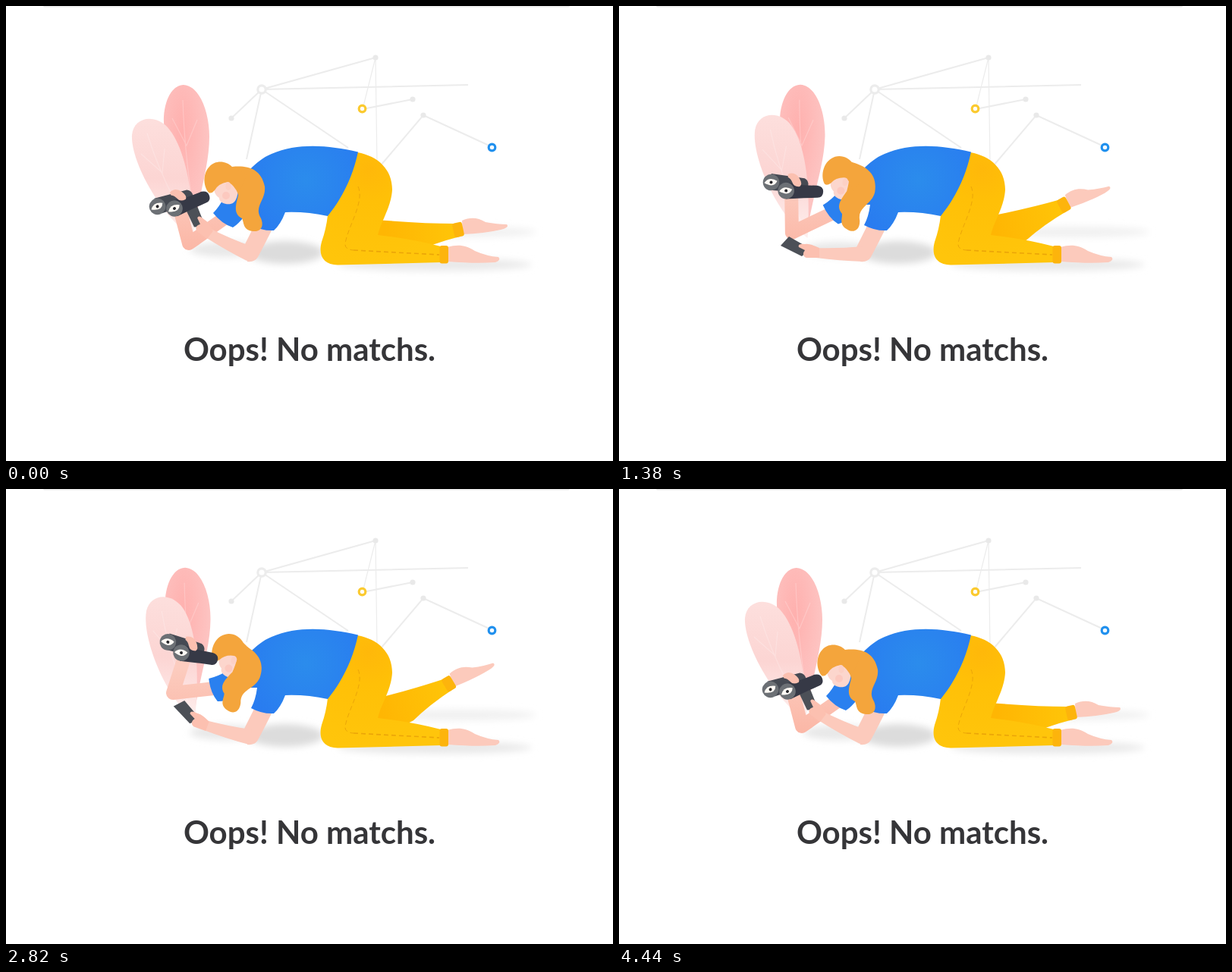
Animation of 800 by 600 pixels, one loop 4.47 s. Source, as an HTML page:

```html
<!DOCTYPE html>
<html lang="en">
<head>
<meta charset="utf-8">
<title>No matches</title>
<style>
html, body { margin: 0; width: 100%; height: 100%; overflow: hidden; background: #fff; }
svg { display: block; width: 800px; height: 600px; }
text { font: 700 42px Lato, sans-serif; fill: #353538; }
.net { fill: none; stroke: #ececec; stroke-width: 2; }
.vein { fill: none; stroke: #fff; stroke-width: 1.2; opacity: .22; }
.skin { fill: #fccabc; }
.cuff { fill: #fdb40c; }
.hair { fill: #f4a53c; }
</style>
</head>
<body>
<svg viewBox="0 0 800 600">
  <defs>
    <filter id="blur" x="-20%" y="-60%" width="140%" height="220%"><feGaussianBlur stdDeviation="5"/></filter>
    <radialGradient id="shirt" gradientUnits="userSpaceOnUse" cx="395" cy="230" r="85">
      <stop offset="0" stop-color="#2b8cec"/><stop offset="1" stop-color="#297cf0"/>
    </radialGradient>
    <radialGradient id="pants" gradientUnits="userSpaceOnUse" cx="478" cy="215" r="125">
      <stop offset="0" stop-color="#ffb80a"/><stop offset=".35" stop-color="#ffc007"/><stop offset="1" stop-color="#ffc50b"/>
    </radialGradient>
    <linearGradient id="farPants" gradientUnits="userSpaceOnUse" x1="500" y1="0" x2="590" y2="0">
      <stop offset="0" stop-color="#ffb603"/><stop offset="1" stop-color="#ffc408"/>
    </linearGradient>
    <linearGradient id="armSkin" gradientUnits="userSpaceOnUse" x1="0" y1="235" x2="0" y2="325">
      <stop offset="0" stop-color="#fcccbf"/><stop offset="1" stop-color="#fbb6a5"/>
    </linearGradient>
    <linearGradient id="paleLeaf" x1="0" y1="0" x2="0" y2="1">
      <stop offset="0" stop-color="#fddfdd"/><stop offset=".5" stop-color="#fcd5d3"/><stop offset="1" stop-color="#fef0ef"/>
    </linearGradient>
    <radialGradient id="pinkLeaf" cx=".4" cy=".32" r=".6">
      <stop offset="0" stop-color="#ffb0ae"/><stop offset="1" stop-color="#fdc4c2"/>
    </radialGradient>
  </defs>

  <rect x="49" y="-4" width="694" height="5.6" rx="2" fill="#e7e7e7"/>

  <g class="net">
    <path d="M297 148L337 110L487 68M609 104L337 110L317 202M337 110L451 187M470 136L536 123M494 210L550 144L641 186"/>
    <path d="M470 136L487 68L489 208" stroke-width="1.2"/>
    <g fill="#fff" stroke-width="3.2">
      <circle cx="337" cy="110" r="5.2"/>
      <circle cx="469.5" cy="135.5" r="4.3" stroke="#fbca2f"/>
      <circle cx="640.5" cy="186.5" r="4.3" stroke="#2090ee"/>
    </g>
    <path d="M297 148h0M487 68h0M536 123h0M550 144h0" stroke="#e9e9e9" stroke-width="7.2" stroke-linecap="round"/>
  </g>

  <g id="backLeaf">
    <path fill="url(#pinkLeaf)" d="M249 292C234 245 206 182 208 146C210 118 222 104 234 104C255 105 268 140 268 172C268 210 255 245 249 292Z"/>
    <path class="vein" d="M233 124Q235 190 247 270M219 148L238 184L252 150"/>
  </g>
  <g id="frontLeaf">
    <path fill="url(#paleLeaf)" d="M248 306C205 280 164 205 166 170C168 147 195 141 213 160C235 185 246 240 248 306Z"/>
    <path class="vein" d="M186 168Q205 230 246 300M178 195L206 220L209 188"/>
  </g>

  <g filter="url(#blur)">
    <ellipse cx="290" cy="321" rx="48" ry="10" fill="#e8e8e8"/>
    <ellipse cx="368" cy="325" rx="50" ry="15" fill="#dcdcdc"/>
    <ellipse cx="595" cy="298" rx="104" ry="7" fill="#f0f0f0"/>
    <ellipse cx="565" cy="341" rx="128" ry="8" fill="#e8e8e8"/>
  </g>

  <g id="farLeg">
    <path class="skin" d="M601 283C612 278 622 279 632 285Q648 288 660 288Q664 292 652 295Q630 300 602 301Z"/>
    <path fill="url(#farPants)" d="M478 281Q545 287 591 287L598 304Q563 313 536 326L474 335Z"/>
    <rect class="cuff" x="-6.5" y="-9.5" width="13" height="19" rx="3" transform="translate(596 295) rotate(-12)"/>
  </g>
  <path class="skin" d="M582 318C595 314 606 315 618 323Q634 330 649 331Q653 335 645 338Q620 340 582 337Z"/>
  <path fill="url(#pants)" d="M463 193C491 198 509 216 509 242C508 265 494 284 490 302Q535 307 573 317L574 338L437 341.5C419 341 411 330 416 311Q422 294 424 276L463 193Z"/>
  <g fill="none" stroke="#eba508" stroke-dasharray="6 4">
    <path d="M464 238C473 258 451 290 447 313Q446 321 458 322" stroke-width="1"/>
    <path d="M458 322L571 328" stroke-width="1.6"/>
  </g>
  <rect class="cuff" x="571.5" y="316" width="11.5" height="23.5" rx="3"/>

  <path id="arm" fill="none" stroke="url(#armSkin)" stroke-width="18" stroke-linejoin="round"/>
  <path id="sleeve" fill="#2a80ef" d="M302 243L287 253Q281 265 273 273Q284 287 299 292Q306 288 316 275L320 255Z"/>
  <path class="skin" d="M328 288L351 294Q340 316 332 331Q328 338 318 337L313 318Z"/>
  <path fill="url(#shirt)" d="M464 192.500C425 183.500 385 180 350 195C338 200 330 207 322 215L312 262L331 262Q329 278 323 289Q338 297 353 296Q362 288 368 272Q396 271 424 277C444 252 457 225 464 192.500Z"/>

  <g id="forearm">
    <path class="skin" d="M322 337Q290 336 260 332L258 319Q290 320 322 317Z"/>
    <g id="hand">
      <path fill="#4c5057" d="M213 316L224 304L252 320L241 330Z"/>
      <path fill="#fcc0b0" d="M264 319Q252 313 245 314Q235 313 237 318L245 322Q240 329 247 332L264 332Z"/>
    </g>
  </g>

  <g id="face">
    <path fill="#fcd6cd" d="M276 235C272 243 276 250 281 253C281 260 290 262 296 261C303 260 306 250 306 240L298 228Z"/>
    <circle cx="290" cy="250" r="5" fill="#fbc0b5" opacity=".6"/>
  </g>
  <path id="locks" class="hair" d="M298 212C318 210 336 214 341 238C343 256 326 264 336 280C341 292 334 298 326 297C312 296 314 286 311 280C299 274 303 262 306 250C305 236 300 225 298 212Z"/>
  <g id="cap">
    <path class="hair" d="M267 246C259 236 260 220 268 212C276 203 290 204 298 212L318 222L306 248Q301 236 292 232Q280 234 275 243Q271 248 267 246Z"/>
    <ellipse cx="293" cy="237.500" rx="3.600" ry="5.400" fill="#fcd0c5"/>
  </g>

  <g id="binoculars">
    <path fill="#464a53" d="M-20 -22L24 -17Q30 -14 29 -7L24 2L-18 0Z"/>
    <path fill="#363946" d="M0 -11L22 -8L41 -8Q49 -7 49 0Q49 8 41 8L24 9L0 11Z"/>
    <g id="lens">
      <circle r="10.8" fill="#6c7075"/>
      <path fill="#fffaf5" d="M-9 1Q-3 -8 8 -2Q4 8 -9 1Z"/>
      <circle r="2" fill="#26262b"/>
    </g>
    <use href="#lens" x="-20" y="-10.5"/>
    <path fill="#fbc0b0" d="M2 -22Q11 -26 17 -17Q22 -9 18 -6Q10 -5 8 -11Q6 -16 2 -18Z"/>
  </g>

  <text x="400" y="468" text-anchor="middle">Oops! No matchs.</text>
</svg>
<script>
const DURATION = 4470;
// Time spans in which the body, the leaves and the phone arm move.
const BODY = [[620, 1400], [1400, 1920], [2050, 2820], [3300, 4430]];
const LEAVES = [[150, 1150], [1150, 1960], [2060, 2950], [2950, 4250]];
const PHONE = [[150, 1000], [2350, 3000], [3300, 4350]];

const svg = id => document.getElementById(id);
const place = (id, transform) => svg(id).setAttribute('transform', transform);
const turn = (angle, x, y) => `rotate(${angle} ${x} ${y})`;
const mix = (a, b, k) => a + (b - a) * k;

function ease(time, [from, to]) {
  const u = Math.min(1, Math.max(0, (time - from) / (to - from)));
  return u * u * (3 - 2 * u);
}

// Starts at 0 and moves to the next value in each span; the last span returns to 0.
const follow = (time, spans, ...values) =>
  spans.reduce((now, span, i) => mix(now, values[i] ?? 0, ease(time, span)), 0);

function draw(time) {
  const lift = follow(time, BODY, .46, .33, 1);
  const tilt = follow(time, BODY, .71, .46, 1);
  const reach = follow(time, PHONE, 1, .35);
  const bow = lift * (1 - lift);

  place('backLeaf', turn(follow(time, LEAVES, 3, -4, 1), 248, 295));
  place('frontLeaf', turn(follow(time, LEAVES, 7, -2, 8), 248, 312));
  place('farLeg', turn(follow(time, BODY, -16, -14, -18.8), 474, 313));
  place('forearm', turn(25 * (1 - reach), 322, 326));
  place('hand', turn(13 * (1 - reach), 258, 325));

  const nod = `translate(${7 * tilt} ${-12 * lift}) ${turn(18 * tilt, 293, 238)}`;
  place('face', nod);
  place('cap', nod);
  place('locks', `translate(${-3 * tilt} ${-2 * tilt}) ${turn(30 * tilt, 316, 238)}`);
  place('binoculars', `translate(${222 + 9 * lift - 24 * bow} ${267 - 51 * lift}) rotate(${32 * tilt - 21})`);

  const elbow = [mix(241, 220, lift) - 14 * bow, mix(313, 269, lift) + 24 * bow];
  const palm = [mix(225, 237, lift) - 14 * bow, mix(252, 216, lift)];
  svg('arm').setAttribute('d', `M${mix(292, 283, lift)} ${mix(277, 262, lift)}L${elbow}L${palm}`);
  place('sleeve', `translate(${-6 * lift} 0) ${turn(33 * lift, 312, 262)}`);
}

const start = performance.now();
function frame() {
  draw((performance.now() - start) % DURATION);
  requestAnimationFrame(frame);
}
frame();
</script>
</body>
</html>
```
